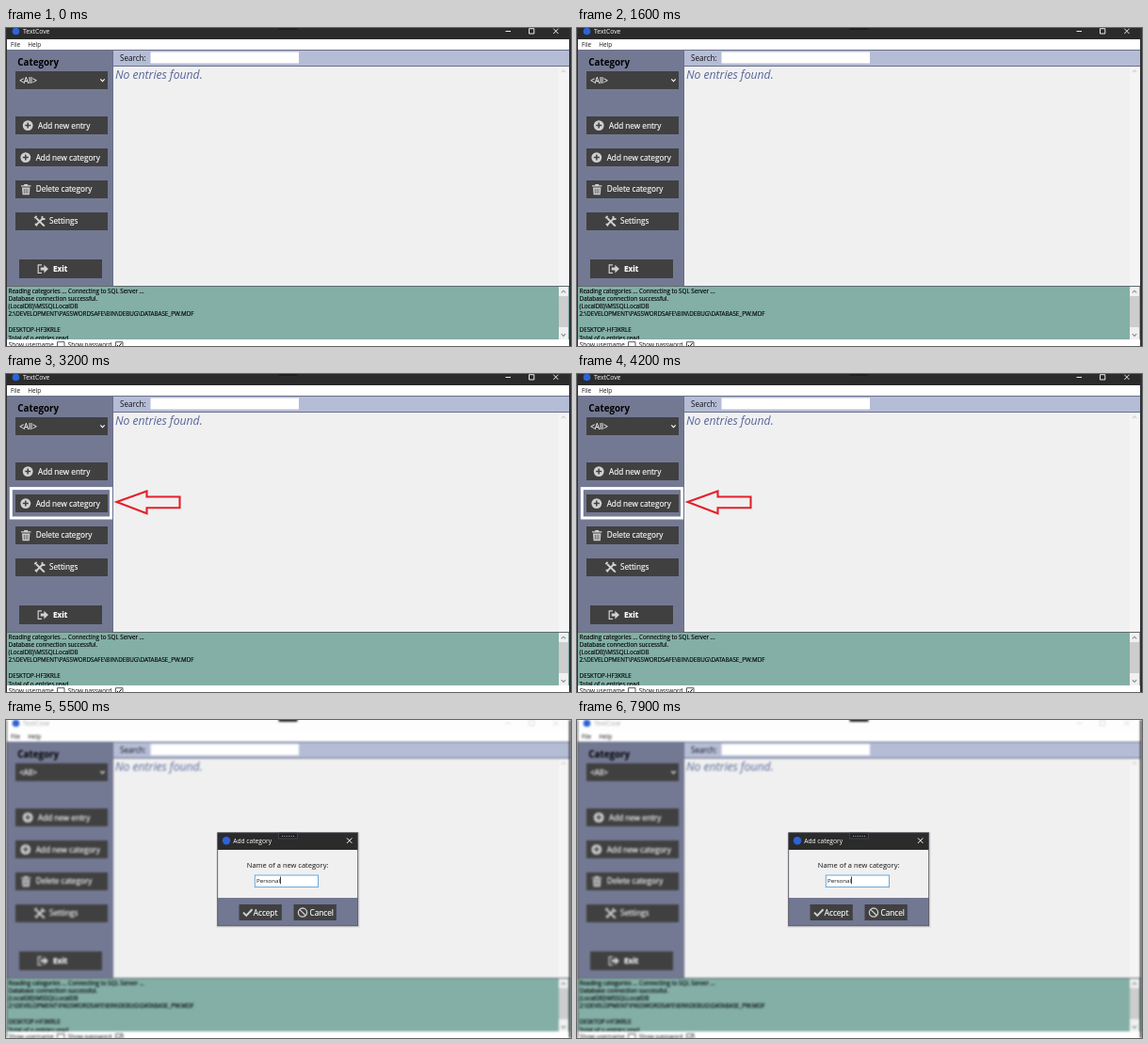
An HTML page for the animation above (8000 ms loop, 600 by 338 pixels).

```html
<!DOCTYPE html>
<html lang="en">
<head>
<meta charset="utf-8">
<title>Adding a category</title>
<style>
  html, body { margin: 0; width: 100%; height: 100%; overflow: hidden; background: #fff; }
  svg { display: block; width: 600px; height: 338px; }
  text { font-family: "Open Sans", "Noto Sans", sans-serif; white-space: pre; }
  .button rect { fill: #404041; }
  .button text { fill: #fff; stroke: #fff; stroke-width: .15; font-size: 8.2px; }
  .icon { fill: #d0d0d0; }
  .line { fill: none; stroke: #d0d0d0; }
  .small { font-size: 6.4px; }
  .log { font-size: 6.25px; fill: #000; stroke: #000; stroke-width: .15; }
  #titlebar { fill: #2b2b2b; color: #fff; }
  #titlebar .caption { fill: currentColor; }
  #titlebar .controls { fill: none; stroke: currentColor; stroke-width: .9; }
  .inactive #titlebar { fill: #fdfdfd; color: #a8a8a8; }
  .inactive #titlebar .controls { color: #d8d8d8; }
  .inactive { filter: url(#soften); }
</style>
</head>
<body>
<svg viewBox="0 0 600 338" xmlns="http://www.w3.org/2000/svg">
  <defs>
    <filter id="soften" filterUnits="userSpaceOnUse" x="-10" y="-10" width="620" height="358" color-interpolation-filters="sRGB">
      <feGaussianBlur stdDeviation=".8"/>
    </filter>
    <g id="plus">
      <circle class="icon" r="5.4"/>
      <path d="M-3 0H3M0-3V3" stroke="#404041" stroke-width="1.5"/>
    </g>
    <path id="chevron" d="M-2.2 1.1L0-1.1L2.2 1.1" fill="none" stroke-width="1.1"/>
  </defs>

  <g id="window">
    <rect x="-10" y="-10" width="620" height="358" fill="#fff"/>

    <g id="titlebar">
      <rect x="-10" y="-10" width="620" height="22"/>
      <circle cx="10.5" cy="3.5" r="3.8" fill="#2d63d8"/>
      <text class="caption" x="18" y="5.9" font-size="6.8">TextCove</text>
      <path class="controls" d="M530.5 3.5h5.5M555.5 .7h5.3v5.3h-5.3zM581.3 .7l5.2 5.3M586.5 .7l-5.2 5.3"/>
    </g>
    <rect x="289.5" y="-5" width="20" height="6.8" fill="#1d1f22"/>
    <g class="small" fill="#151515">
      <text x="5" y="20">File</text>
      <text x="23.3" y="20">Help</text>
    </g>

    <rect x="1" y="23" width="113" height="252" fill="#747993"/>
    <rect x="114" y="23" width="484" height="17" fill="#b5bcd6"/>
    <rect x="114" y="40" width="484" height="234" fill="#f0f0f0"/>
    <rect x="587" y="41" width="10" height="233" fill="#f5f5f5"/>
    <use href="#chevron" x="592" y="46" stroke="#cfcfcf"/>
    <path d="M1 23.5H598M114 40.5H598M113.5 23V275" stroke="#696f8a"/>
    <text x="121" y="35" font-size="8.1" fill="#111">Search:</text>
    <rect x="153.5" y="25.5" width="157.5" height="12" fill="#fff"/>
    <text x="116" y="54.2" font-size="12.2" font-style="italic" fill="#57659a">No entries found.</text>

    <text x="12.3" y="39.9" font-size="9.8" font-weight="700">Category</text>
    <g class="button">
      <rect x="10" y="46" width="98" height="19"/>
      <text x="14.2" y="58.9">&lt;All&gt;</text>
      <use href="#chevron" transform="translate(102.5 55.5) scale(1 -1)" stroke="#fff"/>
    </g>
    <g class="button">
      <rect x="10" y="94" width="98" height="19"/>
      <use href="#plus" x="23.2" y="103.6"/>
      <text x="34" y="106.6">Add new entry</text>
    </g>
    <g class="button">
      <rect x="10" y="128" width="98" height="19"/>
      <use href="#plus" x="20.8" y="137.6"/>
      <text x="31.7" y="140.6">Add new category</text>
    </g>
    <g class="button">
      <rect x="10" y="162" width="98" height="19"/>
      <path class="icon" d="M16 167.3h3.2v-1.3h4v1.3h3.2v1.3H16zM17 169.5h8.4l-.6 7.8h-7.2z"/>
      <path d="M19.3 170.8v5.2M21.2 170.8v5.2M23.1 170.8v5.2" stroke="#404041" stroke-width=".7"/>
      <text x="31.7" y="174.4">Delete category</text>
    </g>
    <g class="button">
      <rect x="10" y="196" width="98" height="19"/>
      <path class="line" d="M32 202l7.8 7.6M39.5 202l-7.8 7.6" stroke-width="2"/>
      <path class="line" d="M30.3 202.2l2.3-2.3M38.5 200v3h3M31 208l2 2.4M38.5 208.3l2.4 2.4" stroke-width="1.8"/>
      <text x="46" y="208.3">Settings</text>
    </g>
    <g class="button">
      <rect x="14" y="246" width="88" height="20"/>
      <path class="line" d="M38 251.8h-3.8v8.6H38" stroke-width="1.2"/>
      <path class="icon" d="M36.7 254.6h3.7v-2.8l4.6 4.3l-4.6 4.3v-2.8h-3.7z"/>
      <text x="50" y="259" font-weight="700">Exit</text>
    </g>

    <rect x="1" y="275" width="597" height="56" fill="#83afa6"/>
    <path d="M1 274.5H598" stroke="#5f6b70"/>
    <rect x="587" y="275" width="10" height="56" fill="#f0f0f0"/>
    <rect x="587" y="285" width="10" height="33" fill="#cdcdcd"/>
    <use href="#chevron" x="592" y="280.3" stroke="#8a8a8a"/>
    <use href="#chevron" transform="translate(592 326.3) scale(1 -1)" stroke="#8a8a8a"/>
    <svg x="0" y="275" width="587" height="56" viewBox="0 275 587 56" style="width:587px;height:56px">
      <g class="log">
        <text x="2.6" y="281.6">Reading categories ... Connecting to SQL Server ...</text>
        <text x="2.6" y="289.9">Database connection successful.</text>
        <text x="2.6" y="298.2">(LocalDB)\MSSQLLocalDB</text>
        <text x="2.6" y="306.4">2:\DEVELOPMENT\PASSWORDSAFE\BIN\DEBUG\DATABASE_PW.MDF</text>
        <text x="2.6" y="323.2">DESKTOP-HF3KRLE</text>
        <text x="2.6" y="331.5">Total of o entries read.</text>
      </g>
    </svg>
    <g class="small" fill="#111">
      <text x="2.8" y="339.2">Show username</text>
      <text x="65.8" y="339.2">Show password</text>
    </g>
    <path d="M54.5 333.7h7.5v7.5h-7.5zM116.5 333.7h7.5v7.5h-7.5z" fill="#fff" stroke="#333" stroke-width=".8"/>
    <path d="M118 337l1.7 1.8l3-4" fill="none" stroke="#111"/>
    <path d="M0 0h1v338h-1zM598 0h2v338h-2z" fill="#2f3136"/>
  </g>

  <g id="pointer" fill="none">
    <rect x="5.3" y="121.6" width="106.2" height="31.4" stroke="#fff" stroke-width="3"/>
    <path d="M117.5 136L149.5 124.5V130.5H184.5V142.3H149.5V148.3Z" stroke="#e3202b" stroke-width="2.1"/>
  </g>

  <g id="dialog">
    <rect x="223.5" y="119.5" width="152" height="101" fill="#000" opacity=".1"/>
    <rect x="224.7" y="119.8" width="149" height="99" fill="#f0f0f0"/>
    <rect x="224.7" y="119.8" width="149" height="18.2" fill="#2b2b2c"/>
    <rect x="224.7" y="189" width="149" height="29.8" fill="#727792"/>
    <rect x="224.7" y="119.8" width="149" height="99" fill="none" stroke="#4a4c56" stroke-width=".8"/>
    <rect x="289.5" y="120" width="20" height="6" fill="#202225" stroke="#4d4f52" stroke-width=".7"/>
    <path d="M293 123.5h13" stroke="#aaa" stroke-dasharray="1 1.4"/>
    <circle cx="234" cy="128.2" r="4.2" fill="#2d63d8"/>
    <text x="241.2" y="130.8" font-size="6.7" fill="#fff">Add category</text>
    <path d="M362 125.5l5.4 5.4M367.4 125.5l-5.4 5.4" stroke="#fff" stroke-width="1"/>
    <text x="255.8" y="157" font-size="7.5" fill="#111">Name of a new category:</text>
    <rect x="264.3" y="165" width="67.2" height="12.6" fill="#fff" stroke="#5a9fd6" stroke-width=".9"/>
    <text x="266" y="172.8" font-size="6.15" fill="#111">Personal</text>
    <path d="M291.5 166.5v7.7" stroke="#111" stroke-width=".8"/>
    <g class="button">
      <rect x="247.5" y="196" width="45.3" height="17"/>
      <path class="line" d="M252 204.6l3.2 3.3l6.3-6.7" stroke-width="2"/>
      <text x="262.8" y="207.5">Accept</text>
    </g>
    <g class="button">
      <rect x="305.5" y="196" width="45.3" height="17"/>
      <circle class="line" cx="315" cy="204.6" r="4.6" stroke-width="1.3"/>
      <path class="line" d="M311.8 201.4l6.4 6.4" stroke-width="1.3"/>
      <text x="322.6" y="207.5">Cancel</text>
    </g>
  </g>
</svg>
<script>
  const LOOP = 8000, POINT_AT = 2800, DIALOG_AT = 5500;
  const byId = id => document.getElementById(id);
  const appWindow = byId("window"), pointer = byId("pointer"), dialog = byId("dialog");
  const show = (el, on) => el.setAttribute("visibility", on ? "visible" : "hidden");
  const start = performance.now();

  function render(t) {
    const dialogOpen = t >= DIALOG_AT;
    show(pointer, t >= POINT_AT && !dialogOpen);
    show(dialog, dialogOpen);
    appWindow.classList.toggle("inactive", dialogOpen);
  }

  function tick(now) {
    render(Math.max(0, now - start) % LOOP);
    requestAnimationFrame(tick);
  }

  render(0);
  requestAnimationFrame(tick);
</script>
</body>
</html>
```
